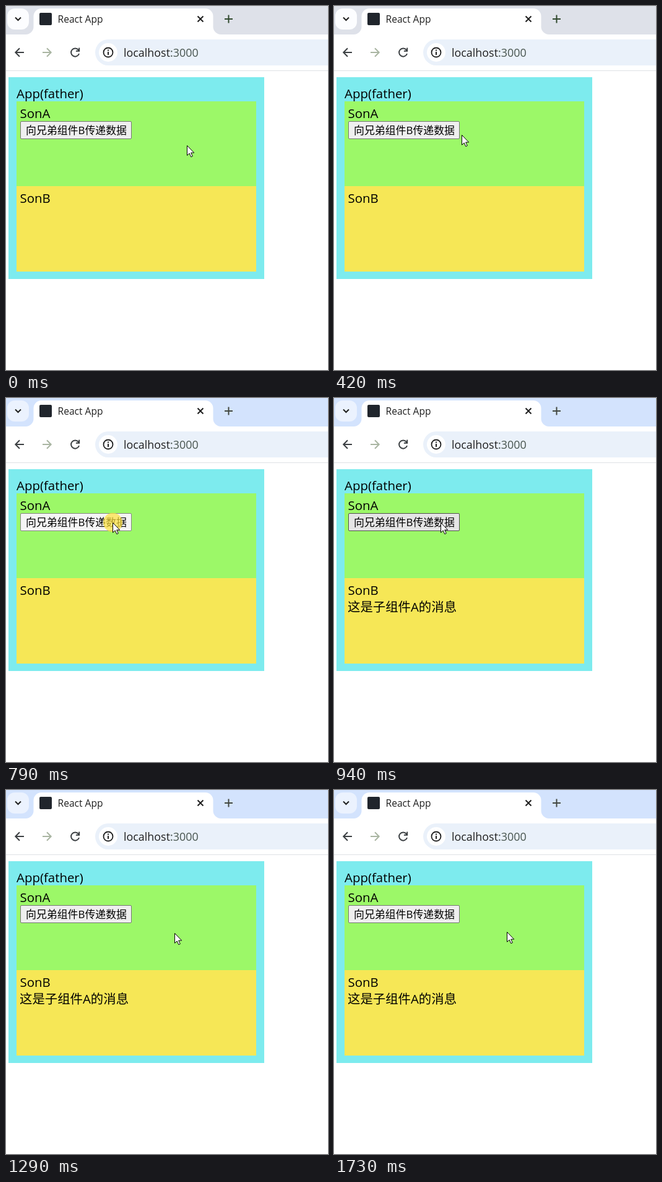
Animation of 520x588 px, one loop 2160 ms. Source, as an HTML page:

```html
<!DOCTYPE html>
<html lang="zh-CN">
<head>
<meta charset="utf-8">
<title>React App</title>
<style>
html, body { margin: 0; width: 100%; height: 100%; overflow: hidden; background: #fff; }
svg { display: block; width: 520px; height: 588px; }
text { font: 500 20.4px "Open Sans", "Noto Sans CJK SC", "Noto Sans CJK", sans-serif; fill: #000; }
.zh { font-weight: 400; }
.line { fill: none; stroke: #3c4043; stroke-width: 2; }

.strip, .search, .plus, .button, .halo, .message, .cursor {
  animation: 2160ms step-end infinite;
}
.strip { animation-name: strip; }
.search { animation-name: search; }
.plus { animation-name: plus; }
.button { animation-name: button; }
.halo { animation-name: halo; }
.message { animation-name: message; }
.cursor { animation-name: move; }

/* window gains focus on click */
@keyframes strip { 0% { fill: #dee1e9; } 36.574%, 100% { fill: #d3e3fd; } }
@keyframes search { 0% { fill: #fcfdff; } 36.574%, 100% { fill: #ebf2fe; } }
@keyframes plus { 0% { stroke: #2f482c; } 36.574%, 100% { stroke: #42473f; } }

/* idle, hover, pressed, hover, idle */
@keyframes button {
  0% { fill: #efefef; stroke: #767676; }
  23.148% { fill: #e5e5e5; stroke: #4f4f4f; }
  36.574% { fill: #f5f5f5; stroke: #858585; }
  43.518% { fill: #e5e5e5; stroke: #4f4f4f; }
  56.944%, 100% { fill: #efefef; stroke: #767676; }
}
@keyframes halo { 0% { opacity: 0; } 36.574% { opacity: .7; } 43.518%, 100% { opacity: 0; } }
@keyframes message { 0% { opacity: 0; } 43.518%, 100% { opacity: 1; } }

@keyframes move {
  0% { transform: translate(292px, 225px); }
  3.24% { transform: translate(286px, 224px); }
  6.481% { transform: translate(273px, 223px); }
  9.722% { transform: translate(258px, 222px); }
  12.962% { transform: translate(241px, 219px); }
  16.203% { transform: translate(223px, 213px); }
  19.444% { transform: translate(206px, 208px); }
  23.148% { transform: translate(190px, 205px); }
  26.388% { transform: translate(178px, 203px); }
  29.629% { transform: translate(172px, 201px); }
  53.703% { transform: translate(187px, 206px); }
  56.944% { transform: translate(237px, 223px); }
  59.722% { transform: translate(272px, 231px); }
  63.425% { transform: translate(276px, 231px); }
  66.666% { transform: translate(278px, 230px); }
  69.907%, 100% { transform: translate(279px, 229px); }
}
</style>
</head>
<body>
<svg viewBox="0 0 520 588">
  <!-- tab strip -->
  <rect class="strip" width="520" height="46"/>
  <rect class="search" x="2" y="4" width="35" height="34" rx="12"/>
  <path class="line" d="M15 18.5l4.5 4.5 4.5-4.5" style="stroke:#1f1f1f"/>
  <path d="M32 46a12.5 12.5 0 0 0 12.5-12.5V16.5A12.5 12.5 0 0 1 57 4H322a12.5 12.5 0 0 1 12.5 12.5V33.5A12.5 12.5 0 0 0 347 46z" fill="#fff"/>
  <rect x="54" y="11" width="20" height="20" rx="2" fill="#20252c"/>
  <text x="83.5" y="27" style="font-size:15.6px;fill:#1f1f1f">React App</text>
  <path class="line" d="M309.5 16.5l9 9m0-9l-9 9" style="stroke:#1f1f1f"/>
  <path class="line plus" d="M353 21h13m-6.5-6.5v13"/>

  <!-- toolbar -->
  <path class="line" d="M29 75H15.5m6.5-6.7L15.3 75l6.7 6.7"/>
  <path class="line" d="M59 75H72.5m-6.5-6.7l6.7 6.7-6.7 6.7" style="stroke:#a9b5a2"/>
  <path class="line" d="M117.3 71.5A6.6 6.6 0 1 0 118 77M118.2 67.5v5.3h-5.3"/>
  <rect x="144" y="54" width="420" height="42" rx="21" fill="#eaf1fa"/>
  <circle cx="165" cy="75" r="15" fill="#fff"/>
  <circle class="line" cx="165" cy="75" r="7.5" style="stroke:#1f1f1f;stroke-width:1.8"/>
  <path class="line" d="M165 74v5M165 70.5v2" style="stroke:#1f1f1f"/>
  <text x="190" y="82" style="font-size:17.9px;fill:#1f1f1f">localhost<tspan fill="#47544e">:3000</tspan></text>
  <path d="M0 104.5H520" stroke="#dfe1e5"/>

  <!-- page -->
  <rect x="4" y="115" width="413" height="326" fill="#7debee"/>
  <rect x="17" y="154" width="387" height="137" fill="#9cf868"/>
  <rect x="17" y="291" width="387" height="138" fill="#f6e756"/>
  <text x="17" y="149">App(father)</text>
  <text x="22.6" y="181">SonA</text>
  <text x="22.6" y="318">SonB</text>
  <text class="zh message" x="22" y="344.5">这是子组件A的消息</text>
  <rect class="button" x="23.5" y="186.5" width="179" height="28" rx="1.5"/>
  <text class="zh" x="32" y="207" style="font-size:16.9px">向兄弟组件B传递数据</text>

  <circle class="halo" cx="172.5" cy="201" r="15.5" fill="#ffe23c"/>
  <path class="cursor" d="M.5.5V16.4L4.2 13l2.6 5.8 2.5-1.1-2.6-5.6h5z" fill="#fff" stroke="#000"/>
</svg>
</body>
</html>
```
